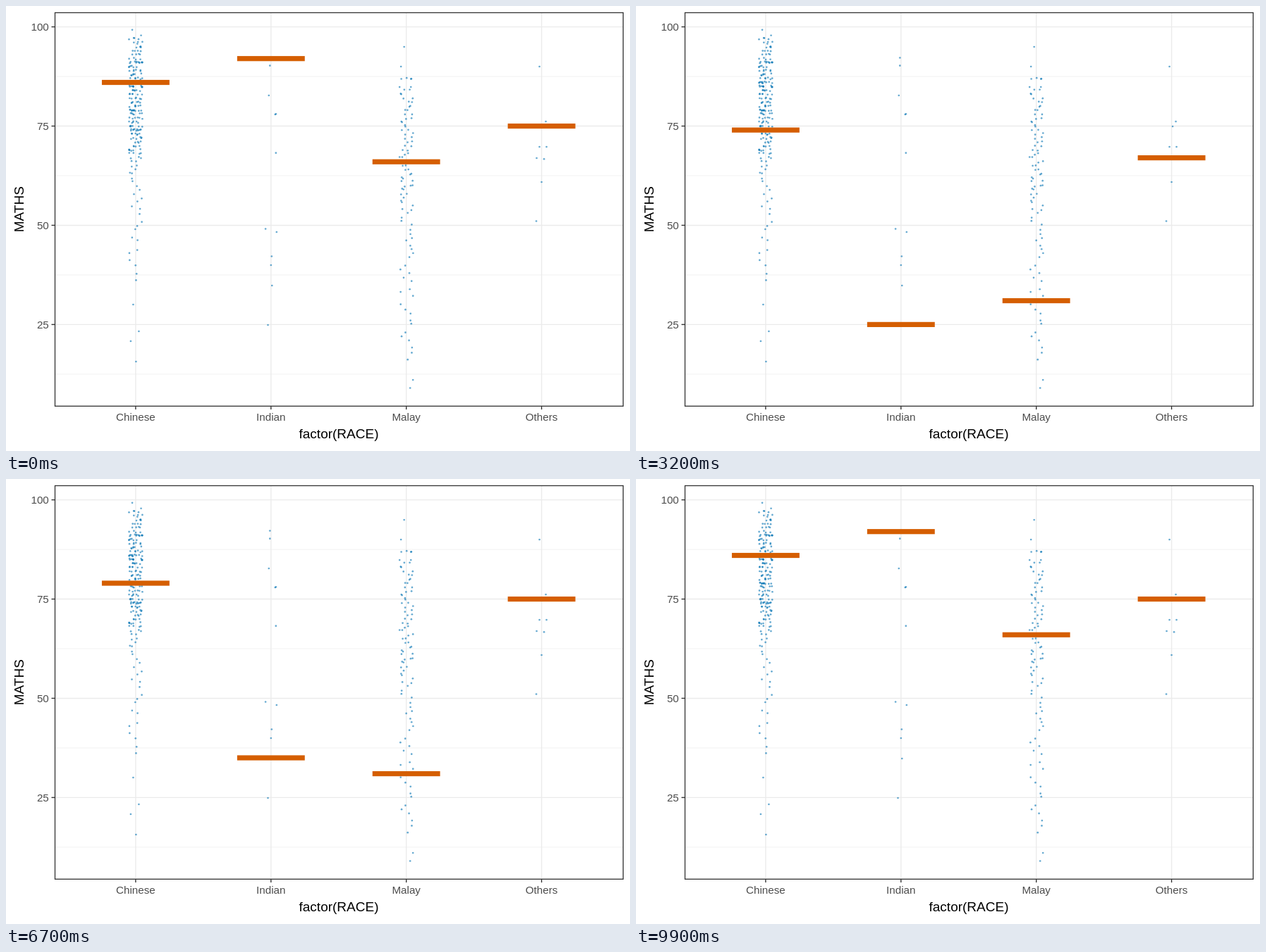
Write an HTML page that moves like this. It is 885x632 px and loops after 10 s.

```html
<!DOCTYPE html>
<html lang="en">
<head>
<meta charset="utf-8">
<title>Maths scores by group</title>
<style>
  html, body { margin: 0; width: 100%; height: 100%; overflow: hidden; background: #fff; }
  svg { display: block; width: 885px; height: 632px; }
  text { font-family: "Liberation Sans", Arial, sans-serif; text-anchor: middle; }
  .tick { font-size: 15.2px; fill: #4d4d4d; }
  .tick.left { text-anchor: end; }
  .title { font-size: 19px; fill: #000; }
  .major { stroke: #ebebeb; stroke-width: 1.4; }
  .minor { stroke: #ebebeb; stroke-width: .7; }
  .mark { stroke: #333; stroke-width: 1.4; }
  .dot { fill: #0072b2; fill-opacity: .6; }
  .bar { fill: #d55e00; }
  .frame { fill: none; stroke: #333; stroke-width: 1.3; }
</style>
</head>
<body>
<svg id="stage" viewBox="0 0 885 632"></svg>
<script>
const stage = document.getElementById('stage');
const panel = { left: 69.5, top: 9.5, right: 875.3, bottom: 568.3 };
const groups = ['Chinese', 'Indian', 'Malay', 'Others'];
const BAR_W = 95.9, BAR_H = 7.2;
const LOOP = 10000, STEP = 100;

// One sampled score per draw for each group.
const draws = [
  [86, 86, 80, 95, 71, 77, 87, 85, 74, 91, 91, 79, 85, 82, 79, 93, 80, 79, 86, 80, 91, 91, 74, 78, 96],
  [92, 49, 68, 83, 78, 83, 42, 35, 25, 78, 90, 25, 68, 42, 78, 68, 83, 35, 68, 78, 25, 48, 35, 68, 25],
  [66, 71, 22, 24, 50, 63, 66, 60, 31, 58, 49, 65, 74, 77, 64, 73, 47, 31, 58, 32, 61, 80, 68, 53, 74],
  [75, 70, 61, 70, 67, 75, 67, 90, 67, 76, 70, 61, 75, 70, 70, 76, 67, 75, 90, 67, 75, 90, 61, 70, 67]
];
const COUNT = draws[0].length;

const scoreY = s => 29.6 + (100 - s) * 5.637;
const groupX = i => 183.9 + i * 191.9;

function add(tag, attrs, text) {
  const el = document.createElementNS('http://www.w3.org/2000/svg', tag);
  for (const key in attrs) el.setAttribute(key, attrs[key]);
  if (text) el.textContent = text;
  return stage.appendChild(el);
}
const line = (cls, x1, y1, x2, y2) => add('line', { class: cls, x1, y1, x2, y2 });
const dot = (x, y) => add('circle', { class: 'dot', cx: x, cy: y, r: 1.35 });
const label = (cls, x, y, text) => add('text', { class: cls, x, y }, text);

let seed = 41;
function random() {
  seed = (seed * 1664525 + 1013904223) % 4294967296;
  return seed / 4294967296;
}

// A row of jittered points around one score.
function scatter(group, score, n) {
  for (let i = 0; i < n; i++) {
    dot(groupX(group) + (random() - .5) * 19.5, scoreY(score + (random() - .5) * .5));
  }
}

// Points that thin out from a high score to a low one.
function tail(group, high, low, n, power) {
  for (let i = 0; i < n; i++) {
    scatter(group, Math.round(high - (high - low) * (i / (n - 1)) ** power), 1);
  }
}

// Lone points as [x offset from the group centre, y].
const lone = [
  [[-3.5, 424], [4.5, 462], [-7, 476], [.5, 505]],
  [[-1.5, 73.5], [-1.5, 84.7], [-3, 127], [6, 154], [7, 153.3], [7, 208.7], [-7.7, 316.5],
   [8, 321], [1, 355.5], [0, 368], [1.5, 397], [-4.3, 453]],
  [[-3, 58], [-7.5, 86], [9.5, 531], [5.5, 542.5]],
  [[-3, 86], [6, 164], [1.5, 171], [-3, 200], [7, 200], [-7, 216], [3.5, 217.3], [0, 250], [-7.5, 305.5]]
];

function drawPoints() {
  lone.forEach((points, g) => points.forEach(([x, y]) => dot(groupX(g) + x, y)));
  const peaks = [91, 86, 85, 79, 74];
  for (let s = 99; s >= 70; s--) {
    scatter(0, s, peaks.includes(s) ? 11 : s > 97 ? 1 : s > 91 || s < 72 ? 4 : 6);
  }
  tail(0, 69, 36, 41, 2.2);
  scatter(2, 87, 4);
  for (let s = 85; s >= 61; s--) scatter(2, s, 2);
  tail(2, 60, 16, 44, 1.5);
}

function drawGrid() {
  for (let s = 12.5; s < 100; s += 25) line('minor', panel.left, scoreY(s), panel.right, scoreY(s));
  for (let s = 25; s <= 100; s += 25) line('major', panel.left, scoreY(s), panel.right, scoreY(s));
  groups.forEach((_, i) => line('major', groupX(i), panel.top, groupX(i), panel.bottom));
}

function drawAxes() {
  add('rect', {
    class: 'frame', x: panel.left, y: panel.top,
    width: panel.right - panel.left, height: panel.bottom - panel.top
  });
  for (let s = 25; s <= 100; s += 25) {
    line('mark', panel.left - 5, scoreY(s), panel.left, scoreY(s));
    label('tick left', 60.8, scoreY(s) + 5.8, String(s));
  }
  groups.forEach((name, i) => {
    line('mark', groupX(i), panel.bottom, groupX(i), panel.bottom + 4.8);
    label('tick', groupX(i), 589.3, name);
  });
  label('title', 472, 614, 'factor(RACE)');
  label('title', 0, 0, 'MATHS').setAttribute('transform', 'translate(24.5 288.7) rotate(-90)');
}

drawGrid();
drawPoints();
const bars = groups.map((_, i) => add('rect', {
  class: 'bar', x: groupX(i) - BAR_W / 2, width: BAR_W, height: BAR_H
}));
drawAxes();

// Draws hold for three steps, then pass through their midpoint; the thirteenth is one step shorter.
const startOf = i => i * 4 - (i > 12 ? 1 : 0);

function render(ms) {
  const step = Math.floor((ms % LOOP) / STEP);
  let now = 0;
  while (now < COUNT && startOf(now + 1) <= step) now++;
  const mix = now < COUNT && step === startOf(now + 1) - 1 ? .5 : 0;
  bars.forEach((bar, g) => {
    const from = draws[g][now % COUNT], to = draws[g][(now + 1) % COUNT];
    bar.setAttribute('y', scoreY(from + (to - from) * mix) - BAR_H / 2);
  });
}

const begin = performance.now();
function tick() {
  render(performance.now() - begin);
  requestAnimationFrame(tick);
}
tick();
</script>
</body>
</html>
```
